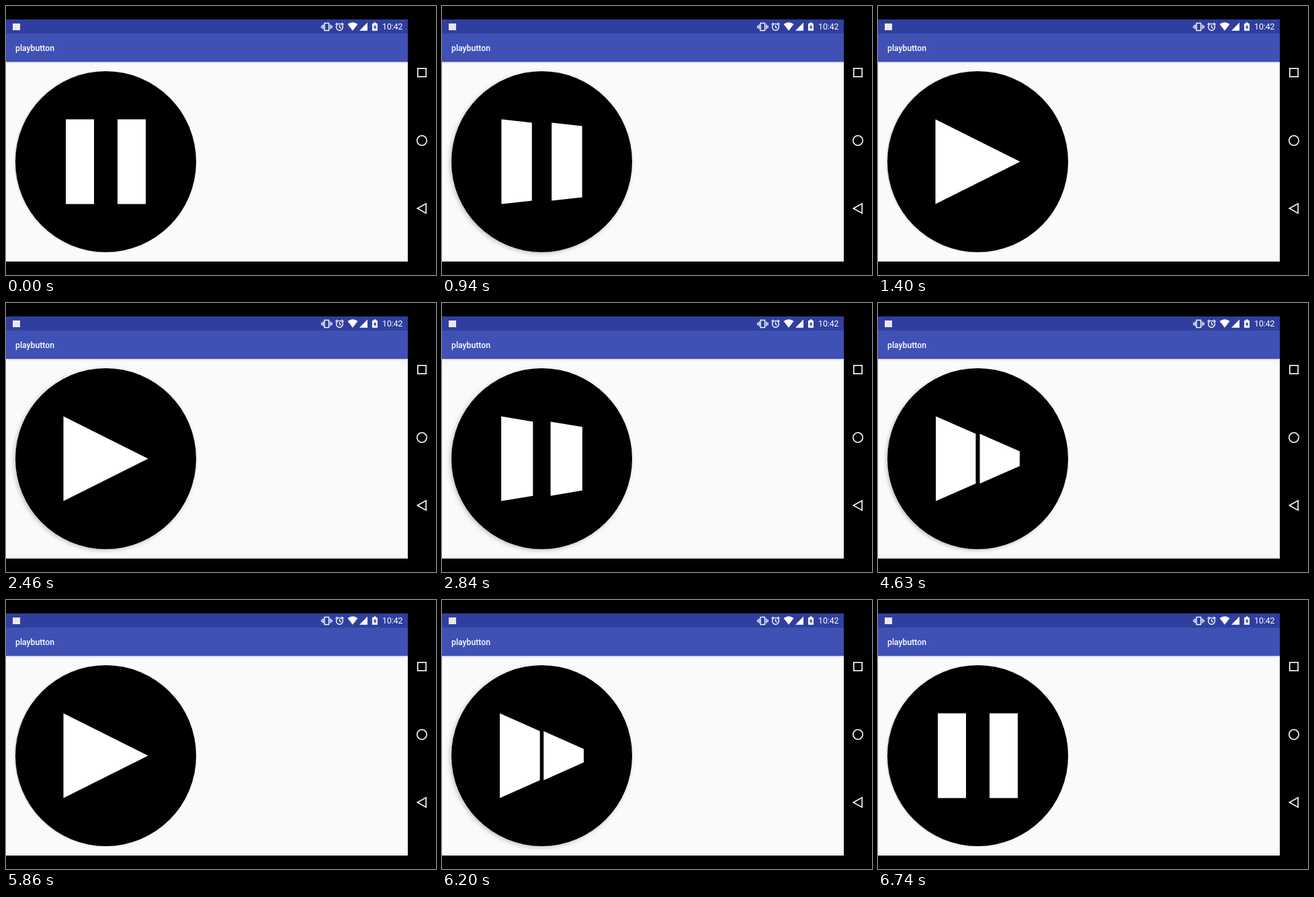
An HTML page that plays this animation: 640x400 px, repeating every 6840 ms.

```html
<!DOCTYPE html>
<html lang="en">
<head>
<meta charset="utf-8">
<title>playbutton</title>
<style>
  html, body { margin: 0; width: 100%; height: 100%; overflow: hidden; background: #000; }
  svg { display: block; width: 640px; height: 400px; }
  text { font-family: Roboto, sans-serif; fill: #fff; }
  .appbar { filter: drop-shadow(0 1px 1.2px rgba(0, 0, 0, .25)); }
  .status { fill: #fff; }
  .line { fill: none; stroke: #fff; stroke-width: 1.4; }
  .nav { fill: none; stroke: #fff; stroke-width: 1.6; }
</style>
</head>
<body>
<svg viewBox="0 0 640 400">
  <rect y="20" width="598" height="360" fill="#fafafa"/>
  <circle id="disc" cx="148.5" cy="231.5" r="134.5"/>
  <path id="icon" fill="#fff"/>

  <rect class="appbar" y="41" width="598" height="42" fill="#3f51b5"/>
  <rect y="20" width="598" height="21" fill="#303f9f"/>
  <text x="14" y="67" font-size="12.25" font-weight="500">playbutton</text>

  <rect x="10" y="26" width="11" height="10" fill="#e8e8ec"/>
  <g class="line">
    <rect x="474" y="25.5" width="6.5" height="11"/>
    <path d="M472 27.5v7M482.7 27.5v7M469.8 29v4M484.9 29v4"/>
    <circle cx="496.5" cy="31.3" r="4.9"/>
    <path d="M496.5 28.3v3.2l2.2 1.4M490.5 27.6l3-2.6M502.5 27.6l-3-2.6"/>
  </g>
  <g class="status">
    <path d="M508.5 27Q516 21.5 523.5 27L516 36.7Z"/>
    <path d="M538 24.5V36.7H526Z"/>
    <path d="M545 26h2.3v-1.5h3.4V26h2.3v10.7h-8z"/>
  </g>
  <path d="M549.7 27.5l-3 4.5h2v3.3l3-4.6h-2z" fill="#303f9f"/>
  <text x="560" y="35" font-size="12.25">10:42</text>

  <rect x="598" width="42" height="400"/>
  <rect y="380" width="640" height="20"/>
  <rect width="640" height="20"/>
  <g class="nav">
    <rect x="612.8" y="92.8" width="12.4" height="12.4"/>
    <circle cx="619" cy="200" r="7.2"/>
    <path d="M612.3 301L625.2 293.8V308.2Z"/>
  </g>
</svg>
<script>
const LOOP = 6840;
// Each tap: when the press begins and the tick at which the icon starts to morph.
const taps = [
  { start: 660, release: 5, toPlay: true },
  { start: 2260, release: 7, toPlay: false },
  { start: 4050, release: 6, toPlay: true },
  { start: 5860, release: 8, toPlay: false }
];
const disc = document.getElementById('disc');
const icon = document.getElementById('icon');
const clamp = v => Math.max(0, Math.min(1, v));
const lerp = (a, b, t) => a + (b - a) * t;

// Ticks come in threes: two last 20 ms, the third 100 ms.
function tickAt(elapsed) {
  const group = Math.floor((elapsed - 20) / 140);
  const rest = elapsed - 20 - group * 140;
  return 1 + 3 * group + Math.min(2, Math.floor(rest / 20));
}

// play: 0 shows the two bars, 1 the triangle.
function iconPath(play) {
  const cx = 148.5, cy = 231.5, half = 63;
  const bar = lerp(42, 63, play), gap = lerp(35, 0, play) / 2;
  const middle = half * (1 - play / 2), end = half * (1 - play);
  const quad = (x, h1, h2) =>
    `M${x} ${cy - h1}L${x + bar} ${cy - h2}V${cy + h2}L${x} ${cy + h1}Z`;
  return quad(cx - gap - bar, half, middle) + quad(cx + gap, middle, end);
}

// The light sits up and to the right, so the shadow falls down and to the left.
function shadow(lift) {
  const z = lerp(1.75, 5.25, lift);
  return `drop-shadow(${-0.3 * z}px ${0.45 * z}px ${lerp(1, 3, lift)}px rgba(0, 0, 0, .22))`;
}

function draw(time) {
  const tap = taps.findLast(p => p.start <= time);
  let play = 0, lift = 0;
  if (tap) {
    const tick = tickAt(time - tap.start);
    const eased = 1 - (1 - clamp((tick - tap.release) / 12)) ** 2;
    play = tap.toPlay ? eased : 1 - eased;
    lift = clamp(tick / 6) - clamp((tick - tap.release - 6) / 6);
  }
  icon.setAttribute('d', iconPath(play));
  disc.style.filter = shadow(lift);
}

function frame() {
  draw(performance.now() % LOOP);
  requestAnimationFrame(frame);
}
frame();
</script>
</body>
</html>
```
